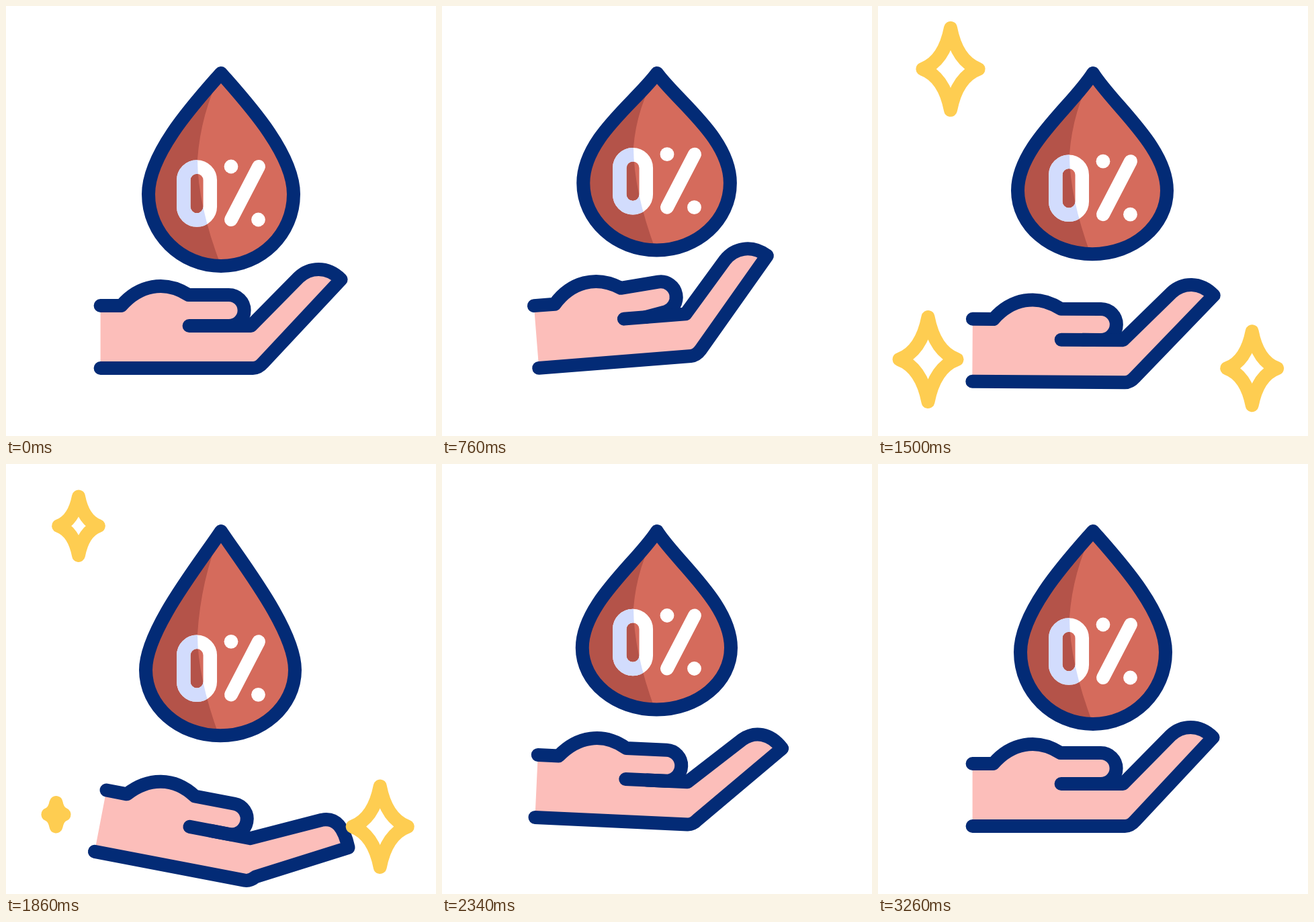
An HTML page with a canvas for the animation above (3600 ms loop, 640 px wide and 640 px high).

```html
<!DOCTYPE html>
<html lang="en">
<head>
<meta charset="utf-8">
<title>Drop over an open hand</title>
<style>
html, body { margin: 0; width: 100%; height: 100%; overflow: hidden; background: #fff; }
canvas { display: block; width: 100vmin; height: 100vmin; }
</style>
</head>
<body>
<canvas id="stage" width="640" height="640"></canvas>
<script>
const ctx = document.getElementById('stage').getContext('2d');
const LOOP = 3600, RAD = Math.PI / 180;
const NAVY = '#032b76', SKIN = '#fcbeba', RED = '#d56b5c', DARK = '#b45349',
      WHITE = '#fff', LAVENDER = '#d2dcfd', GOLD = '#fecd51';

// time, hand angle, hand shift, label shift, drop: centre x, widest y, bottom, half width, c1x, c1y, c2y
const REST = [0, 0, 0, 320, 280, 387, 108, 355, 140, 218];
const HIGH = [0, -29.7, -26, 319.5, 263, 353, 110.5, 348, 145, 195];
const POSES = [
  [400, ...REST],
  [1190, -10.4, 0, -42, 319, 242, 333, 111, 350, 150, 170],
  [1810, 11, 39.5, 26, 319, 307, 405, 111, 352, 148, 248],
  [2590, ...HIGH],
  [2660, ...HIGH],
  [3200, ...REST]
];
const STARS = [
  { x: 74.5, y: 520, grow: 715, shrink: 1497 },
  { x: 108, y: 88, grow: 875, shrink: 1655 },
  { x: 556.7, y: 534, grow: 958, shrink: 1790 }
];

function ease(t, start, length) {
  const u = Math.min(1, Math.max(0, (t - start) / length));
  return u * u * (3 - 2 * u);
}

function poseAt(t) {
  let i = 0;
  while (i < POSES.length - 2 && t > POSES[i + 1][0]) i++;
  const [a, b] = [POSES[i], POSES[i + 1]];
  const p = ease(t, a[0], b[0] - a[0]);
  return a.slice(1).map((v, k) => v + (b[k + 1] - v) * p);
}

function turn([x, y], [px, py], deg) {
  const c = Math.cos(deg * RAD), s = Math.sin(deg * RAD);
  return [px + (x - px) * c - (y - py) * s, py + (x - px) * s + (y - py) * c];
}

function stroke(path, color, width) {
  ctx.strokeStyle = color;
  ctx.lineWidth = width;
  ctx.stroke(path);
}

function fill(path, color) {
  ctx.fillStyle = color;
  ctx.fill(path);
}

function drawHand(angle, shift) {
  const bend = angle * (angle > 0 ? 2 : 0.9);
  const lift = Math.min(0, angle) * 1.15;
  const finger = p => turn(p, [385, 490], bend);

  const top = new Path2D('M141 446H172C198 416 236 407 272 430');
  const [cx, cy] = turn([332, 453], [278, 470], lift);
  top.arc(cx, cy, 23, (lift - 90) * RAD, (90 + 3 * lift) * RAD);
  top.lineTo(305, 476);

  // the fingertip gets shorter while the fingers lie flat
  const flat = Math.max(0, bend) / 22;
  const tip = p => {
    const [x, y] = finger(p);
    return [x - 11 * flat, y + 7 * flat];
  };
  const addPalm = path => {
    path.lineTo(365, 476);
    path.lineTo(...finger([436, 404]));
    path.bezierCurveTo(...finger([452, 389]), ...tip([478, 386]), ...tip([499, 407]));
    path.lineTo(383, 531);
    path.quadraticCurveTo(376, 539, 368, 539);
    path.lineTo(141, 539);
  };
  const palm = new Path2D('M273 476');
  addPalm(palm);
  const skin = new Path2D(top);
  addPalm(skin);

  ctx.save();
  ctx.translate(140.6, 493 + shift);
  ctx.rotate(angle * RAD);
  ctx.translate(-141, -493);
  fill(skin, SKIN);
  stroke(top, NAVY, 20);
  stroke(palm, NAVY, 20);
  ctx.restore();
}

function drawLabel(shift, color, zeroOnly) {
  ctx.save();
  ctx.translate(0, shift);
  const zero = new Path2D();
  zero.roundRect(264.3, 239.5, 39.5, 79, 19.75);
  stroke(zero, color, 20.5);
  if (!zeroOnly) {
    stroke(new Path2D('M376 239L335 318'), color, 20);
    for (const [x, y] of [[335, 239], [375.5, 318]]) {
      const dot = new Path2D();
      dot.arc(x, y, 10.4, 0, 7);
      fill(dot, color);
    }
  }
  ctx.restore();
}

function drawDrop(label, cx, wide, bottom, half, c1x, c1y, c2y) {
  const r = cx + half, l = cx - half, k = 0.5523;
  const low = wide + (bottom - wide) * k;
  const drop = new Path2D(
    `M320 100C${c1x} ${c1y} ${r} ${c2y} ${r} ${wide}` +
    `C${r} ${low} ${cx + half * k} ${bottom} ${cx} ${bottom}` +
    `C${cx - half * k} ${bottom} ${l} ${low} ${l} ${wide}` +
    `C${l} ${c2y} ${640 - c1x} ${c1y} 320 100Z`);
  // the lower part of the shade rides with the label
  const mid = 228 + label;
  const shade = new Path2D(
    `M320 100Q290 ${(92 + mid) / 2} 285 ${mid}` +
    `Q285 ${mid + 67} 320 ${mid + 159}L150 ${mid + 190}V100Z`);

  fill(drop, RED);
  ctx.save();
  ctx.clip(drop);
  fill(shade, DARK);
  drawLabel(label, WHITE);
  ctx.clip(shade);
  drawLabel(label, LAVENDER, true);
  ctx.restore();
  stroke(drop, NAVY, 20);
}

function drawStar({ x, y, grow, shrink }, t) {
  const s = ease(t, grow, 700) - ease(t, shrink, 560);
  if (s < 0.04) return;
  const w = 43 * s, h = 63 * s, a = 10 * s, b = 12 * s;
  const star = new Path2D(
    `M0 ${-h}Q${a} ${-b} ${w} 0Q${a} ${b} 0 ${h}Q${-a} ${b} ${-w} 0Q${-a} ${-b} 0 ${-h}Z`);
  ctx.save();
  ctx.translate(x, y + 6 * s);
  stroke(star, GOLD, 20 * Math.min(1, s / 0.1));
  ctx.restore();
}

function draw(now) {
  const t = now % LOOP;
  const [angle, shift, ...drop] = poseAt(t);
  ctx.fillStyle = WHITE;
  ctx.fillRect(0, 0, 640, 640);
  ctx.lineCap = ctx.lineJoin = 'round';
  drawHand(angle, shift);
  drawDrop(...drop);
  STARS.forEach(star => drawStar(star, t));
}

let start;
function tick() {
  const now = performance.now();
  start ??= now;
  draw(now - start);
  requestAnimationFrame(tick);
}
tick();
</script>
</body>
</html>
```
